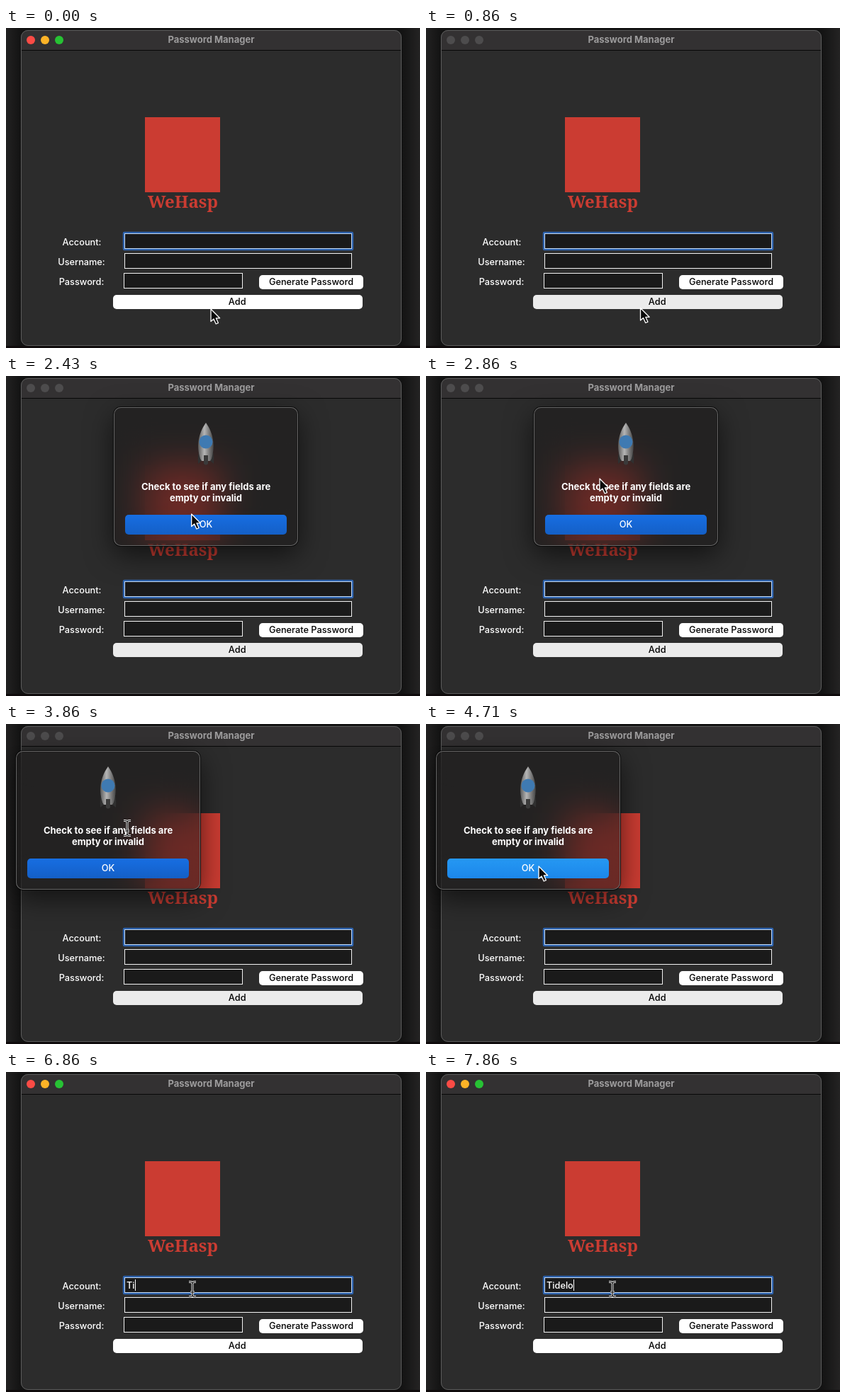
Write an HTML page that moves like this. It is 584 by 452 pixels and loops after 8000 ms.

```html
<!DOCTYPE html>
<html lang="en">
<head>
<meta charset="utf-8">
<title>Password Manager</title>
<style>
html, body { margin: 0; width: 100%; height: 100%; overflow: hidden; background: #1b1a1a; }
svg, #dialog { position: absolute; left: 0; top: 0; }
svg { display: block; overflow: hidden; }
text { font: 500 12.75px Inter, Arial, sans-serif; fill: #fff; }
.mid { text-anchor: middle; }
.bold { font-weight: 700; font-size: 13px; }
.dark { fill: #000; }
.field { fill: #1a1a1a; stroke: #f2f2f2; }
#dialog {
  left: 152px; top: 44px; width: 260px; height: 196px; border-radius: 10px;
  background: rgba(30, 29, 29, .55);
  -webkit-backdrop-filter: blur(26px); backdrop-filter: blur(26px);
  box-shadow: inset 0 0 0 1px #666, 0 0 0 1px rgba(0, 0, 0, .7), 0 12px 38px rgba(0, 0, 0, .6);
}
</style>
</head>
<body>
<svg width="584" height="452" viewBox="0 0 584 452">
  <defs>
    <linearGradient id="desk" x2="1" y2="0">
      <stop offset="0" stop-color="#222121"/><stop offset=".036" stop-color="#131313"/>
      <stop offset=".956" stop-color="#131313"/><stop offset="1" stop-color="#242323"/>
    </linearGradient>
    <clipPath id="frame"><rect x="21" y="3" width="537" height="446" rx="10"/></clipPath>
  </defs>
  <rect width="584" height="452" fill="url(#desk)"/>
  <rect y="449" width="584" height="3" fill="#0f0b0c"/>
  <g clip-path="url(#frame)">
    <rect x="21" y="3" width="537" height="446" fill="#2c2c2c"/>
    <rect x="21" y="3" width="537" height="28" fill="#333132"/>
    <rect x="21" y="31" width="537" height="1" fill="#080808"/>
  </g>
  <rect x="21.5" y="3.5" width="536" height="445" rx="9.5" fill="none" stroke="#5d5d5d"/>
  <g id="lights">
    <circle cx="35" cy="17" r="6"/><circle cx="55" cy="17" r="6"/><circle cx="75" cy="17" r="6"/>
  </g>
  <text class="mid bold" x="289.5" y="21" style="fill:#9d9c9d">Password Manager</text>

  <rect x="196" y="126" width="106" height="106" fill="#cb3c32"/>
  <text class="mid" x="249.5" y="254" style="font:800 24px 'Noto Serif',serif;fill:#cb3c32">WeHasp</text>

  <text class="mid" x="107" y="307">Account:</text>
  <text class="mid" x="106.5" y="335">Username:</text>
  <text class="mid" x="106.5" y="363">Password:</text>
  <rect x="166" y="289" width="323" height="24" rx="1" fill="none" stroke="#2d62ad" stroke-width="2.4"/>
  <rect class="field" x="167.5" y="290.5" width="320" height="21" style="stroke:#c6dcf6"/>
  <rect class="field" x="167.5" y="318.5" width="320" height="21"/>
  <rect class="field" x="166.5" y="346.5" width="167" height="21"/>
  <text id="entry" x="170" y="306"></text>
  <rect id="caret" y="293" width="1" height="16" fill="#fff"/>

  <rect x="357" y="349" width="147" height="20" rx="5" fill="#fff"/>
  <text class="mid dark" x="430.5" y="363">Generate Password</text>
  <rect id="add" x="151" y="377" width="352" height="20" rx="5"/>
  <text class="mid dark" x="326.2" y="391">Add</text>
</svg>

<div id="dialog">
  <svg width="260" height="196" viewBox="0 0 260 196">
    <defs>
      <linearGradient id="metal">
        <stop offset="0" stop-color="#5c5c5c"/><stop offset=".4" stop-color="#b5b5b5"/>
        <stop offset="1" stop-color="#444"/>
      </linearGradient>
      <linearGradient id="blue" x2="0" y2="1">
        <stop offset="0" stop-color="#176ee2"/><stop offset="1" stop-color="#145fc6"/>
      </linearGradient>
      <linearGradient id="bright" x2="0" y2="1">
        <stop offset="0" stop-color="#2598f3"/><stop offset="1" stop-color="#1c87ea"/>
      </linearGradient>
    </defs>
    <path d="M121 61Q118 67 119 80L125 75H135L141 80Q142 67 139 61Z" fill="#303030"/>
    <path d="M130 22C138 33 144 50 139 69Q138 74 136 76H124Q122 74 121 69C116 50 122 33 130 22Z" fill="url(#metal)"/>
    <path d="M127 68H133V80Q130 83 127 80Z" fill="#3a3a3a"/>
    <circle cx="130" cy="49" r="9.5" fill="#3f7ab2"/>
    <text class="mid bold" x="130" y="117">Check to see if any fields are</text>
    <text class="mid bold" x="130" y="133">empty or invalid</text>
    <rect id="ok" x="16" y="152" width="228" height="28" rx="5"/>
    <text class="mid" x="130" y="170">OK</text>
  </svg>
</div>

<svg width="584" height="452" viewBox="0 0 584 452">
  <path id="arrow" d="M0 0V17.5L4 14 7.2 21 10.4 19.6 7.3 12.8H12.6Z" fill="#0a0a0a" stroke="#fff" stroke-width="1.3" stroke-linejoin="round"/>
  <g id="beam" fill="none">
    <path d="M-5-10.5H-3Q0-10.5 0-8 0-10.5 3-10.5H5M0-8V8M-5 10.5H-3Q0 10.5 0 8 0 10.5 3 10.5H5M-3 4H3" stroke="#eee" stroke-width="3"/>
    <path d="M-5-10.5H-3Q0-10.5 0-8 0-10.5 3-10.5H5M0-8V8M-5 10.5H-3Q0 10.5 0 8 0 10.5 3 10.5H5M-3 4H3" stroke="#111" stroke-width="1.2"/>
  </g>
</svg>

<script>
const LOOP = 8000, RATE = 7;
const $ = id => document.getElementById(id);
const show = (el, on) => el.style.visibility = on ? 'visible' : 'hidden';

// step, x, y, pointer shape
const path = [
  [0, 289, 397, 'arrow'], [2, 300, 386, 'arrow'], [4, 300, 386, 'arrow'],
  [8, 305, 405, 'arrow'], [10, 305, 405, 'arrow'], [11, 305, 405, ''],
  [16, 270, 220, 'arrow'], [19, 245, 145, 'arrow'], [20, 245, 145, 'arrow'],
  [24, 107, 139, 'arrow'], [25, 118, 139, 'beam'], [27, 171, 147, 'beam'],
  [29, 176, 170, 'arrow'], [32, 159, 201, 'arrow'], [34, 159, 201, 'arrow'],
  [37, 225, 272, 'arrow'], [38, 250, 295, 'beam'], [39, 263, 307, 'beam'], [56, 263, 307, 'beam']
];
const keys = [46, 48, 49, 51, 52, 54];
const word = 'Tidelo';
const colors = ['#fb4b45', '#fdb327', '#27c234'];
const lights = [...$('lights').children];

function pointerAt(n) {
  const i = path.findIndex((p, k) => n >= p[0] && n < path[k + 1][0]);
  const [a, ax, ay, kind] = path[i], [b, bx, by] = path[i + 1];
  const u = (n - a) / (b - a);
  return { x: ax + (bx - ax) * u, y: ay + (by - ay) * u, kind };
}

function draw(n) {
  const modal = n >= 4 && n < 35;
  lights.forEach((c, i) => c.setAttribute('fill', modal ? '#4d4c4d' : colors[i]));
  $('add').setAttribute('fill', modal ? '#ebebeb' : '#fff');

  const drag = Math.min(1, Math.max(0, (n - 20) / 4));
  $('dialog').style.display = n >= 16 && n < 35 ? 'block' : 'none';
  $('dialog').style.left = Math.round(152 - 138 * drag) + 'px';
  $('dialog').style.top = Math.round(44 - 6 * drag) + 'px';
  $('ok').setAttribute('fill', n >= 32 ? 'url(#bright)' : 'url(#blue)');

  const typed = keys.filter(k => n >= k).length;
  $('entry').textContent = word.slice(0, typed);
  const end = typed ? 170 + $('entry').getComputedTextLength() : 169;
  $('caret').setAttribute('x', Math.round(end));
  show($('caret'), n >= 38 && n < 42 || n >= 44);

  const p = pointerAt(n);
  for (const id of ['arrow', 'beam']) {
    show($(id), p.kind === id);
    $(id).setAttribute('transform', `translate(${p.x} ${p.y})`);
  }
}

let last = -1;
function tick() {
  const t = performance.now() % LOOP;
  const n = Math.floor((t + 5) * RATE / 1000) % (LOOP * RATE / 1000);
  if (n !== last) draw(last = n);
  requestAnimationFrame(tick);
}
tick();
</script>
</body>
</html>
```
